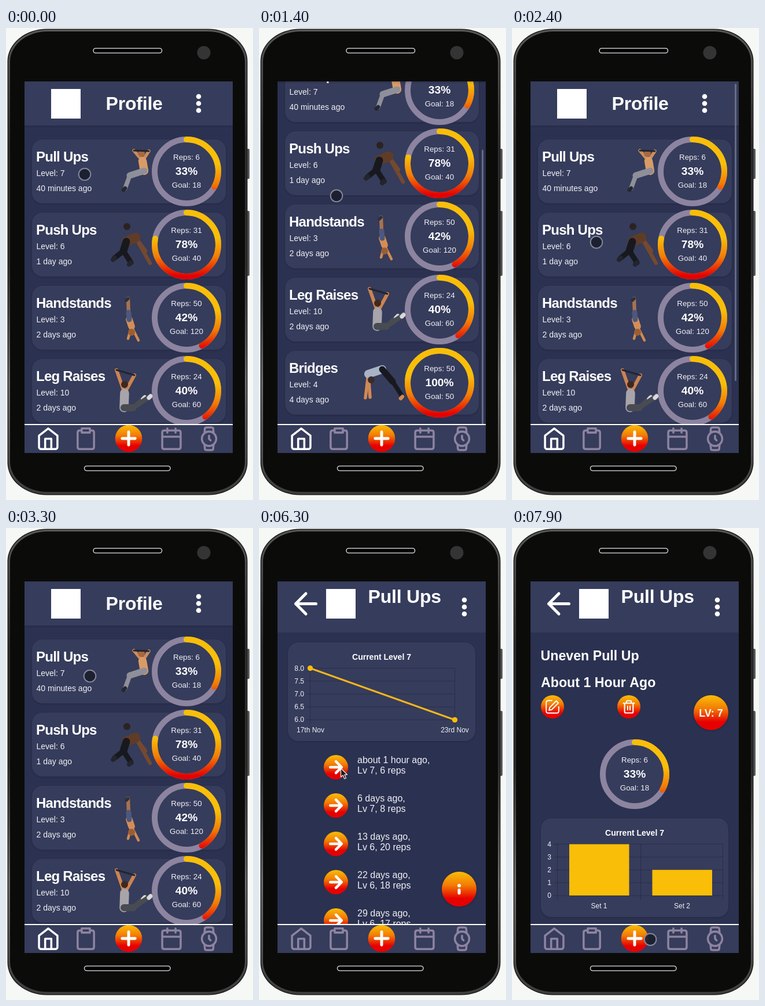
Recreate the animation shown at these times as an HTML page with a canvas. Size 427 by 813 pixels, loop 8 s.

```html
<!DOCTYPE html>
<html lang="en">
<head>
<meta charset="utf-8">
<title>Workout tracker</title>
<style>
html, body { margin: 0; width: 100%; height: 100%; overflow: hidden; background: #f6f8f6; }
canvas { display: block; }
</style>
</head>
<body>
<canvas id="stage" width="427" height="813"></canvas>
<script>
const ctx = document.getElementById('stage').getContext('2d');
const LOOP = 8000, STEP = 100, TAU = Math.PI * 2;
const PAGE = '#2b3150', PANEL = '#363c5b', MUTED = '#8d84a0', GRID = 'rgba(22,26,48,.38)';
const YELLOW = '#f9be08', RED = '#e60000';

// Icons live on a 24 unit grid.
const icons = {
  home: 'M3 9l9-7 9 7v11a2 2 0 0 1-2 2H5a2 2 0 0 1-2-2zM9 22V12h6v10',
  clipboard: 'M16 4h2q2 0 2 2v14q0 2-2 2H6q-2 0-2-2V6q0-2 2-2h2M8 2h8v4H8z',
  calendar: 'M5 4h14q2 0 2 2v14q0 2-2 2H5q-2 0-2-2V6q0-2 2-2zM16 2v4M8 2v4M3 10h18',
  watch: 'M19 12a7 7 0 1 1-14 0a7 7 0 1 1 14 0M12 9v3l1.5 1.5M7.5 6.6L8 2q0-1 2-1h4q2 0 2 1l.5 4.6M7.5 17.4L8 22q0 1 2 1h4q2 0 2-1l.5-4.6',
  plus: 'M12 5v14M5 12h14',
  left: 'M19 12H5M12 19l-7-7 7-7',
  right: 'M5 12h14M12 5l7 7-7 7',
  edit: 'M11 3H6q-3 0-3 3v12q0 3 3 3h12q3 0 3-3v-6M17.5 3.5l3 3L11 16l-4 1 1-4z',
  trash: 'M3 6h18M19 6v14q0 2-2 2H7q-2 0-2-2V6M8 6V4q0-2 2-2h4q2 0 2 2v2M10 11v6M14 11v6'
};
for (const name in icons) icons[name] = new Path2D(icons[name]);

const clamp = (v, low = 0, high = 1) => Math.max(low, Math.min(high, v));
const ramp = (t, start, end) => clamp((t - start) / (end - start));
const easeOut = (p, power) => 1 - (1 - p) ** power;
const mix = (a, b, p) => a + (b - a) * p;

// Straight moves of the pointer: start, end, x, y reached.
const moves = [
  [300, 700, 143, 469], [800, 1600, 131, 229], [1600, 1700, 131, 241], [1700, 2400, 146, 369],
  [2400, 2900, 152, 181], [2900, 3300, 145, 255], [3700, 4400, 101, 180],
  [5300, 5500, 70, 381], [5600, 5900, 140, 414], [6500, 7100, 39, 430]
];
function sweep(cx, rx, a, cy, ry, b) {
  return [cx - rx * Math.cos(a), cy - ry * Math.cos(b)];
}
function pointer(t) {
  if (t > 7100) {
    const p = ramp(t, 7100, 7900);
    return sweep(171, 132, 4.17 * p, 578, 148, 3.63 * p);
  }
  if (t > 4400 && t <= 5300) {
    const p = ramp(t, 4400, 5300);
    return sweep(230, 135, 5.92 * p - 0.3, 401, 234, 4.77 * p - 0.335);
  }
  let x = 136, y = 252;
  if (t > 5300) [x, y] = [124, 464];
  for (const [start, end, toX, toY] of moves) {
    if (t > 5300 && end < 5300) continue;
    const p = ramp(t, start, end);
    x = mix(x, toX, p);
    y = mix(y, toY, p);
  }
  return [x, y];
}
// The list follows the finger while it drags.
function scrollAt(t) {
  if (t < 800 || t > 2400) return 0;
  return clamp((t < 1750 ? 454 : 369) - pointer(t)[1], 0, 140);
}

function box(x, y, w, h, r, fill) {
  ctx.beginPath();
  ctx.roundRect(x, y, w, h, r);
  ctx.fillStyle = fill;
  ctx.fill();
}
function disc(x, y, r, fill) {
  ctx.beginPath();
  ctx.arc(x, y, r, 0, TAU);
  ctx.fillStyle = fill;
  ctx.fill();
}
function line(color, width, ...points) {
  ctx.beginPath();
  for (const [x, y] of points) ctx.lineTo(x, y);
  ctx.strokeStyle = color;
  ctx.lineWidth = width;
  ctx.stroke();
}
function text(str, x, y, size, { bold, align = 'left', spacing = 0 } = {}) {
  ctx.font = `${bold ? 'bold ' : ''}${size}px "Liberation Sans", Arial, sans-serif`;
  ctx.textAlign = align;
  ctx.letterSpacing = spacing + 'px';
  ctx.fillStyle = bold ? '#fff' : '#f1f1f6';
  ctx.fillText(str, x, y);
}
function icon(name, x, y, scale, color = '#fff', width = 2) {
  ctx.save();
  ctx.translate(x, y);
  ctx.scale(scale, scale);
  ctx.translate(-12, -12);
  ctx.strokeStyle = color;
  ctx.lineWidth = width;
  ctx.stroke(icons[name]);
  ctx.restore();
}
function fire(y, r, from, to) {
  const g = ctx.createLinearGradient(0, y - r, 0, y + r);
  g.addColorStop(from, YELLOW);
  g.addColorStop((from + to) / 2, '#f37c04');
  g.addColorStop(to, RED);
  return g;
}
function button(x, y, r) {
  disc(x, y, r, fire(y, r, 0, 0.77));
}
function shadowed(draw) {
  ctx.save();
  ctx.shadowColor = 'rgba(15,18,40,.35)';
  ctx.shadowBlur = 4;
  ctx.shadowOffsetY = 1;
  draw();
  ctx.restore();
}
function ring(x, y, reps, goal, percent) {
  disc(x, y, 55, PANEL);
  ctx.lineWidth = 10;
  for (const [share, color] of [[1, MUTED], [percent / 100, fire(y, 60, 0.4, 0.95)]]) {
    ctx.strokeStyle = color;
    ctx.beginPath();
    ctx.arc(x, y, 55, -TAU / 4, TAU * (share - 0.25));
    ctx.stroke();
  }
  text('Reps: ' + reps, x, y - 20, 13.33, { align: 'center' });
  text(percent + '%', x, y + 6, 19.2, { bold: true, align: 'center' });
  text('Goal: ' + goal, x, y + 28, 13.33, { align: 'center' });
}

// A figure is posed by its joints, measured from the top of its card.
function figure({ head, shoulder, hands, hip, knee, feet, skin, hair, top, pants, shin = pants, shoe, build = 10, bar }) {
  for (const hand of hands) line(skin, build / 2, shoulder, hand);
  for (const foot of feet) {
    line(shin, build * 0.7, knee, foot);
    line(shoe, build * 0.6, foot, [foot[0] - 3, foot[1] + 3]);
  }
  line(top, build * 1.3, shoulder, hip);
  line(pants, build, hip, knee);
  disc(...head, 6, hair);
  if (bar) line('#23252f', 3, ...hands);
}
const exercises = [
  { name: 'Pull Ups', level: 7, when: '40 minutes ago', reps: 6, goal: 18, percent: 33, pose: {
    head: [234, 24], shoulder: [236, 37], hands: [[221, 19], [247, 20]], hip: [239, 54], knee: [214, 62], feet: [[206, 84]],
    skin: '#c98d5d', hair: '#a9683f', top: '#d99b66', pants: '#8f8f99', shoe: '#25272f', build: 11, bar: true } },
  { name: 'Push Ups', level: 6, when: '1 day ago', reps: 31, goal: 40, percent: 78, pose: {
    head: [209, 24], shoulder: [224, 43], hands: [[249, 87], [241, 66]], hip: [208, 50], knee: [203, 66], feet: [[188, 78], [216, 86]],
    skin: '#75492f', hair: '#2b2222', top: '#5f3c27', pants: '#17191f', shoe: '#23252c', build: 13 } },
  { name: 'Handstands', level: 3, when: '2 days ago', reps: 50, goal: 120, percent: 42, pose: {
    head: [217, 80], shoulder: [217, 70], hands: [[211, 91], [229, 94]], hip: [213, 58], knee: [212, 46], feet: [[211, 22]],
    skin: '#d08a52', hair: '#9a5e36', top: '#d28e58', pants: '#4d587c', shin: '#a8734f', shoe: '#2c303e', build: 9 } },
  { name: 'Leg Raises', level: 10, when: '2 days ago', reps: 24, goal: 60, percent: 40, pose: {
    head: [205, 44], shoulder: [205, 59], hands: [[191, 19], [222, 28]], hip: [204, 84], knee: [220, 84], feet: [[240, 66], [250, 64]],
    skin: '#cb8453', hair: '#40281f', top: '#a7a4aa', pants: '#484b52', shoe: '#d8d8dd', build: 12, bar: true } },
  { name: 'Bridges', level: 4, when: '4 days ago', reps: 50, goal: 50, percent: 100, pose: {
    head: [194, 50], shoulder: [189, 40], hands: [[184, 81], [192, 80]], hip: [213, 32], knee: [231, 53], feet: [[248, 79]],
    skin: '#d08a55', hair: '#3b2b29', top: '#a9b3c5', pants: '#17191f', shoe: '#d08a55', build: 11 } }
];

function dots(x, y) {
  for (const dy of [-12, 0, 12]) disc(x, y + dy, 4.3, '#fff');
}
function logo(x) {
  box(x, 105, 51, 51, 0, '#fff');
}
function title(str, x, y) {
  text(str, x, y, 32, { bold: true, spacing: -0.2 });
}
function exerciseCard({ name, level, when, reps, goal, percent, pose }) {
  shadowed(() => box(45, 0, 335, 110, 18, PANEL));
  text(name, 52, 38, 24, { bold: true, spacing: -0.75 });
  text('Level: ' + level, 52.5, 63, 14);
  text(when, 52.5, 89, 14);
  ring(312, 55, reps, goal, percent);
  figure(pose);
}
function homePage(t) {
  const scroll = scrollAt(t);
  ctx.fillStyle = PAGE;
  ctx.fillRect(32, 92, 360, 592);
  exercises.forEach((exercise, i) => {
    ctx.save();
    ctx.translate(0, 192 + 126 * i - scroll);
    exerciseCard(exercise);
    ctx.restore();
  });
  ctx.save();
  ctx.translate(0, 76 * (ramp(t, 1900, 2176) - ramp(t, 900, 1300)));
  shadowed(() => box(32, 92, 360, 76, 0, PANEL));
  logo(78);
  title('Profile', 172.5, 141);
  dots(333, 130);
  ctx.restore();
  const shown = t < 1800 ? ramp(t, 800, 900) - ramp(t, 1500, 1700) : 1 - ramp(t, 2500, 2700);
  if (shown > 0) box(385, 96 + 0.81 * scroll, 3, 512, 1.5, `rgba(120,124,148,${0.75 * shown})`);
}
function detailFrame() {
  ctx.fillStyle = PAGE;
  ctx.fillRect(32, 92, 360, 640);
  ctx.fillStyle = PANEL;
  ctx.fillRect(32, 92, 360, 88);
  icon('left', 81, 130.5, 2.5);
  logo(116);
  title('Pull Ups', 188.5, 129);
  dots(355, 136);
}
// Card with five horizontal rules, labelled downwards from the highest value.
function chartCard(y, left, right, highest, step, digits, columns) {
  shadowed(() => box(50, y, 324, 170, 18, PANEL));
  text('Current Level 7', 212, y + 30, 14, { bold: true, align: 'center' });
  ctx.lineCap = 'butt';
  for (let i = 0; i < 5; i++) {
    const ruleY = y + 44.5 + 22.2 * i;
    line(GRID, 1, [left - 7, ruleY], [right, ruleY]);
    text((highest - step * i).toFixed(digits), left - 10.5, ruleY + 4, 12, { align: 'right' });
  }
  for (const x of columns) line(GRID, 1, [x, y + 44], [x, y + 141]);
  ctx.lineCap = 'round';
}
function historyPage(t) {
  detailFrame();
  chartCard(197, 88.5, 338.5, 8, 0.5, 1, [88.5, 338.5]);
  text('17th Nov', 89, 352, 12, { align: 'center' });
  text('23rd Nov', 338.5, 352, 12, { align: 'center' });
  const start = [88.5, 330.5 - 89 * easeOut(ramp(t, 3700, 4500), 4)], end = [338.5, 330.5];
  line('#f3b51d', 3, start, end);
  for (const point of [start, end]) disc(...point, 4.7, YELLOW);
  const entries = [['about 1 hour', 7, 6], ['6 days', 7, 8], ['13 days', 6, 20], ['22 days', 6, 18], ['29 days', 6, 17]];
  entries.forEach(([when, level, reps], i) => {
    const y = 412 + 66 * i;
    button(133, y, 21);
    icon('right', 133, y, 1.4, '#fff', 3.2);
    text(when + ' ago,', 170, y - 7, 16);
    text(`Lv ${level}, ${reps} reps`, 170, y + 11, 16);
  });
  shadowed(() => button(346, 622, 30));
  disc(346, 616, 3, '#fff');
  line('#fff', 5, [346, 623.5], [346, 629]);
}
function workoutPage(t) {
  detailFrame();
  text('Uneven Pull Up', 49.5, 228, 23.2, { bold: true });
  text('About 1 Hour Ago', 50, 274, 23.2, { bold: true });
  button(70, 308, 20);
  icon('edit', 70, 308, 1.2, '#fff', 1.6);
  button(202, 308, 20);
  icon('trash', 202, 308, 1.05);
  shadowed(() => button(344, 318, 30));
  text('LV: 7', 344, 325, 18, { bold: true, align: 'center' });
  ring(212, 424, 6, 18, 33);
  chartCard(500, 78.5, 365, 4, 1, 0, [78.5, 222.5, 364.5]);
  const grow = easeOut(ramp(t, 6400, 7300), 4);
  [4, 2].forEach((reps, i) => {
    const height = 22.1 * reps * grow;
    ctx.fillStyle = YELLOW;
    ctx.fillRect(99 + 143.5 * i, 633 - height, 103.5, height);
    text('Set ' + (i + 1), 150.5 + 143.5 * i, 655, 12, { align: 'center' });
  });
}
function enter(page, t, start) {
  const p = easeOut(ramp(t, start, start + 300), 3);
  if (p === 0) return;
  ctx.save();
  ctx.globalAlpha = p;
  ctx.translate(0, 40 * (1 - p));
  page(t);
  ctx.restore();
}
function navBar(t) {
  ctx.fillStyle = PANEL;
  ctx.fillRect(32, 682, 360, 50);
  ctx.fillStyle = '#fff';
  ctx.fillRect(32, 682, 360, 2);
  icon('home', 73, 707.5, 1.77, t < 3700 ? '#fff' : MUTED);
  icon('clipboard', 138, 707.5, 1.77, MUTED);
  icon('calendar', 286, 707.5, 1.77, MUTED);
  icon('watch', 351, 707.5, 1.77, MUTED);
  button(212, 707, 23.3);
  icon('plus', 212, 707, 1.6, '#fff', 3.1);
}
function phone() {
  ctx.fillStyle = '#f6f8f6';
  ctx.fillRect(0, 0, 427, 813);
  for (const [y, h] of [[208, 52], [315, 112]]) box(414, y, 7, h, 2, '#56575a');
  const rim = ctx.createLinearGradient(0, 0, 0, 813);
  ['#5a5a5a', '#2c2c2c', '#2c2c2c', '#6c6c6c', '#3a3a3a'].forEach((color, i) => rim.addColorStop(i / 4, color));
  box(2.5, 1.5, 415, 803, { x: 68, y: 56 }, '#1c1d1c');
  box(4, 3, 412, 800, { x: 67, y: 55 }, rim);
  box(7, 6, 406, 793, { x: 64, y: 52 }, '#0b0c0a');
  for (const [x, y, w] of [[151, 35, 118.5], [135.5, 754.5, 148.5]]) {
    box(x, y, w, 8, 4, '#000');
    ctx.strokeStyle = '#c4c4c4';
    ctx.lineWidth = 1.6;
    ctx.stroke();
  }
  disc(342, 42.5, 11.5, '#343434');
}
function arrow(x, y) {
  ctx.save();
  ctx.translate(x, y);
  const shape = new Path2D('M0 0v15l3.6-3.2 2.7 6.2 2.7-1.2-2.6-6H11z');
  ctx.fillStyle = '#1c1c1c';
  ctx.fill(shape);
  ctx.strokeStyle = '#eee';
  ctx.lineWidth = 1.2;
  ctx.stroke(shape);
  ctx.restore();
}
function cursor(t) {
  const [x, y] = pointer(t);
  if (t >= 6100 && t < 6500) return arrow(x + 1.5, y);
  disc(x, y, 10.3, 'rgba(26,30,44,.9)');
  ctx.strokeStyle = '#85879a';
  ctx.lineWidth = 2;
  ctx.stroke();
}
function render(t) {
  ctx.lineCap = ctx.lineJoin = 'round';
  phone();
  ctx.save();
  ctx.beginPath();
  ctx.rect(32, 92, 360, 640);
  ctx.clip();
  if (t < 3900) homePage(t);
  if (t < 6600) enter(historyPage, t, 3600);
  enter(workoutPage, t, 6300);
  navBar(t);
  ctx.restore();
  cursor(t);
}
function tick() {
  render(Math.floor(performance.now() % LOOP / STEP) * STEP);
  requestAnimationFrame(tick);
}
tick();
</script>
</body>
</html>
```
